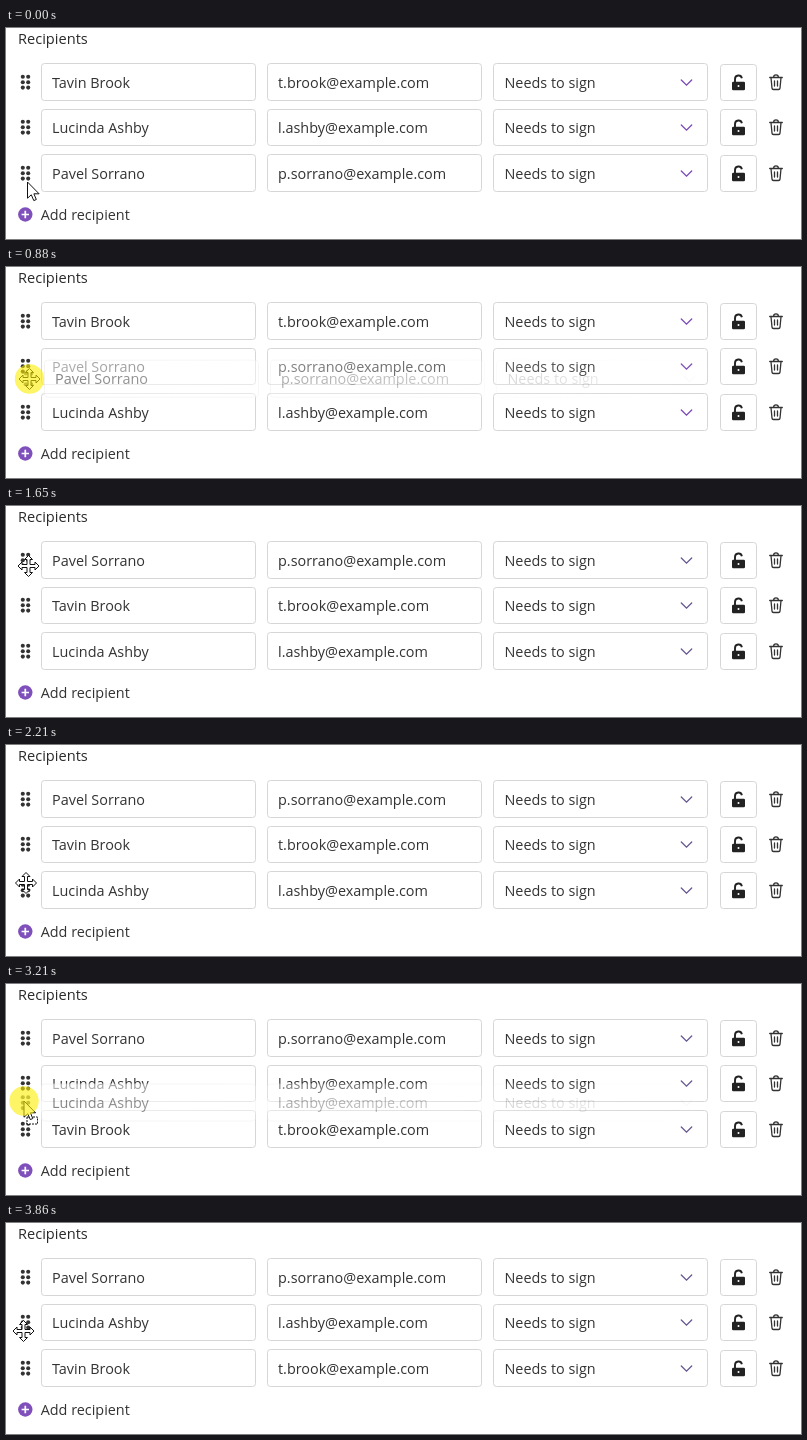
These frames come from a looping animation (795 px wide and 211 px high, 4.08 s). An HTML page:

```html
<!DOCTYPE html>
<html lang="en">
<head>
<meta charset="utf-8">
<title>Reorder recipients</title>
<style>
  html, body { margin: 0; width: 100%; height: 100%; overflow: hidden; background: #fff; }
  svg { display: block; width: 795px; height: 211px; }
  text { font: 14.4px "Open Sans", "Noto Sans", sans-serif; fill: #333; }
  .title { font-size: 14.6px; fill: #2a2a2a; }
  .box { fill: #fff; stroke: #d6d6d6; }
  .ghost .box { stroke: #ececec; }
  .line { fill: none; stroke: #333; stroke-width: 1.3; stroke-linecap: round; }
  .cursor { fill: #fff; stroke: #111; }
</style>
</head>
<body>
<svg viewBox="0 0 795 211"></svg>
<script>
const LOOP = 4080;
// Top and height of each row.
const SLOTS = [[35.5, 37], [81.5, 36], [126.5, 37]];
const PEOPLE = [
  ["Tavin Brook", "t.brook@example.com"],
  ["Lucinda Ashby", "l.ashby@example.com"],
  ["Pavel Sorrano", "p.sorrano@example.com"],
];

// Each drag: person, time span and the point where the row was grabbed.
const DRAGS = [
  { person: 2, from: 760, to: 1650, x: 20.5, y: 145.3 },
  { person: 1, from: 2970, to: 3860, x: 18, y: 143.5 },
];
// Row order from a given time on.
const ORDERS = [[0, [0, 1, 2]], [880, [0, 2, 1]], [1100, [2, 0, 1]], [3210, [2, 1, 0]]];

// Pointer: time, x, y, kind ("drag" is the arrow with the drop badge).
const POINTER = [
  [0, 21.5, 154, "arrow"], [120, 22, 149, "move"], [450, 21, 149, "move"],
  [760, 22, 138, "move"], [880, 23.5, 112, "move"], [980, 24.5, 88, "drag"],
  [1100, 25.5, 62.5, "drag"], [1200, 23, 60, "drag"], [1320, 22, 59, "drag"],
  [1650, 22.5, 60, "move"], [1750, 21, 74, "move"], [1870, 20, 96, "move"],
  [1970, 20, 121, "move"], [2090, 20, 143, "move"], [2210, 20, 138, "move"],
  [2310, 20, 146, "move"], [2430, 19.5, 146.5, "move"],
  [2970, 18.5, 138, "move"], [3090, 18, 128, "drag"], [3210, 18, 117, "drag"],
  [3310, 17.5, 111, "drag"], [3430, 17, 109, "drag"], [3530, 17, 108, "drag"],
  [3860, 17.5, 108, "move"],
];
// Spans with the mouse button held.
const PRESSES = [[450, 1650], [2650, 3860]];

const box = (x, y, w, h) => `<rect class="box" x="${x}" y="${y}" width="${w}" height="${h}" rx="3"/>`;
const text = (x, y, s) => `<text x="${x}" y="${y}">${s}</text>`;
const at = (x, y, content) => `<g transform="translate(${x} ${y})">${content}</g>`;

const grip = [-5.4, 0, 5.4].flatMap(y => [16.8, 22.2].map(x =>
  `<circle cx="${x}" cy="${18.7 + y}" r="2.05" fill="#333"/>`)).join("");

const lock = `<path d="M729 19V15.5a3.5 3.5 0 0 1 6.9-.8" fill="none" stroke="#222" stroke-width="1.9"/>
  <rect x="726" y="18.3" width="13" height="8.4" rx="1.2" fill="#222"/>
  <circle cx="732.5" cy="22.4" r="1" fill="#fff"/>`;

const trash = `<path class="line" d="M763.7 14H776.3M767.6 13.7a2.4 2.4 0 0 1 4.8 0
  M765 14.3L766 24.6q.1 1.4 1.5 1.4H772.5q1.4 0 1.5-1.4L775 14.3M768.5 17.5V22.5M771.5 17.5V22.5"/>`;

const row = ([name, email], accent, h) =>
  [35.5, 261.5, 487.5].map(x => box(x, 0, 214, h)).join("") + box(714.5, h - 36, 36, 36) +
  at(0, h - 37, grip +
    text(46, 24, name) + text(272, 24, email) + text(498.5, 24, "Needs to sign") +
    `<path class="line" style="stroke:${accent}" d="M675.3 16.5l5.2 5.2 5.2-5.2"/>` +
    lock + trash);

const page = `<defs>
    <linearGradient id="fade" gradientUnits="userSpaceOnUse" x1="20" x2="720">
      <stop stop-color="#fff" stop-opacity=".63"/><stop offset="1" stop-color="#fff" stop-opacity="0"/>
    </linearGradient>
    <mask id="ghost" maskUnits="userSpaceOnUse" x="0" y="0" width="795" height="211">
      <rect width="795" height="211" fill="url(#fade)"/>
    </mask>
  </defs>
  <text class="title" x="12" y="16">Recipients</text>` +
  text(34.7, 192, "Add recipient") +
  `<circle cx="19.3" cy="186.5" r="7.2" fill="#7f50bb"/>
   <path d="M15.6 186.5h7.4M19.3 182.8v7.4" stroke="#fff" stroke-width="1.7"/>`;

const arrow = `<path class="cursor" d="M0 0V16.2L3.8 12.8 6.3 18.6 8.8 17.5 6.4 11.8H11.6Z"/>`;
const badge = `<rect x="3" y="16" width="10.5" height="7" fill="#fff" stroke="#111" stroke-dasharray="2 1"/>`;
const CURSORS = {
  arrow,
  drag: badge + arrow,
  move: `<path class="cursor" d="M0-10.5L4-6.5H1.5V-1.5H6.5V-4L10.5 0 6.5 4V1.5H1.5V6.5H4L0 10.5
    -4 6.5H-1.5V1.5H-6.5V4L-10.5 0-6.5-4V-1.5H-1.5V-6.5H-4Z"/>`,
};

const latest = (list, t) => list.findLast(entry => entry[0] <= t);

function scene(t) {
  const [, x, y, kind] = latest(POINTER, t);
  const accent = t < 1100 ? "#7a48b8" : "#65558f";
  const order = latest(ORDERS, t)[1];
  const drag = DRAGS.find(d => t >= d.from && t < d.to);
  const pressed = PRESSES.some(([from, to]) => t >= from && t < to);

  const rows = order.map((p, i) => {
    const [top, height] = SLOTS[i];
    return at(0, top, row(PEOPLE[p], accent, height));
  }).join("");
  const ghost = drag ? `<g class="ghost" mask="url(#ghost)">` +
    at(x - drag.x, SLOTS[2][0] + y - drag.y, row(PEOPLE[drag.person], accent, 37)) + "</g>" : "";
  const halo = pressed ? `<circle cx="${x}" cy="${y}" r="14.7" fill="#fcee00" opacity=".6"/>` : "";
  return page + rows + ghost + at(x, y, CURSORS[kind]) + halo;
}

const svg = document.querySelector("svg");
let shown = "";
function tick() {
  const next = scene(performance.now() % LOOP);
  if (next !== shown) svg.innerHTML = shown = next;
  requestAnimationFrame(tick);
}
tick();
</script>
</body>
</html>
```
